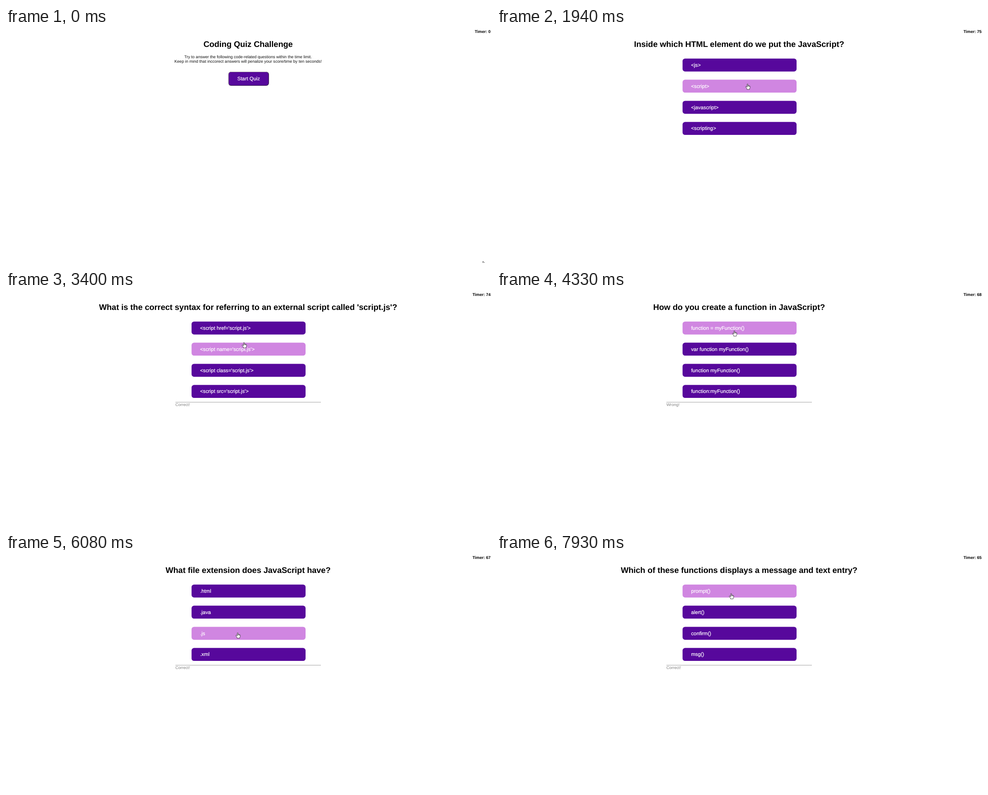
An HTML page with a canvas that plays this animation: 1075x521 px, repeating every 8 s.

```html
<!DOCTYPE html>
<html lang="en">
<head>
<meta charset="utf-8">
<title>Coding Quiz</title>
<style>
html, body { margin: 0; width: 100%; height: 100%; overflow: hidden; background: #fff; }
canvas { display: block; }
</style>
</head>
<body>
<canvas id="stage" width="1075" height="521"></canvas>
<script>
const ctx = document.getElementById('stage').getContext('2d');
const LOOP = 8000;
const ZOOM = 0.565; // page pixels to stage pixels
const MID = 536.6;
const PURPLE = '#57089c';
const PINK = '#d086e1';

const pages = [
  { at: 0, title: 'Coding Quiz Challenge' },
  { at: 1130, title: 'Inside which HTML element do we put the JavaScript?',
    options: ['<js>', '<script>', '<javascript>', '<scripting>'] },
  { at: 2630, title: "What is the correct syntax for referring to an external script called 'script.js'?",
    options: ['href', 'name', 'class', 'src'].map(a => `<script ${a}='script.js'>`), result: 'Correct!' },
  { at: 3930, title: 'How do you create a function in JavaScript?',
    options: ['function = ', 'var function ', 'function ', 'function:'].map(s => s + 'myFunction()'), result: 'Wrong!' },
  { at: 5560, title: 'What file extension does JavaScript have?',
    options: ['.html', '.java', '.js', '.xml'], result: 'Correct!' },
  { at: 6700, title: 'Which of these functions displays a message and text entry?',
    options: ['prompt()', 'alert()', 'confirm()', 'msg()'], result: 'Correct!' }
];

const ticks = [[0, 0], [1130, 75], [3330, 74], [4330, 68], [5330, 67], [6330, 66], [7330, 65]];

// Each path point: [step count, x, y]
const home = [1057, 517];
const moves = [
  { at: 70, step: 66, path: [[3, 960, 440], [7, 680, 235], [12, 556, 120]] },
  { at: 1130, step: 80, path: [[3, 557, 144.5]] },
  { at: 1940, step: 70, path: [[1, 555.3, 124], [8, 531, 133]] },
  { at: 3030, step: 74, path: [[6, 527.5, 114], [9, 526, 88]] },
  { at: 4860, step: 70, path: [[5, 518, 153], [8, 514, 171]] },
  { at: 6080, step: 67.5, path: [[1, 513.5, 174.5], [5, 504.5, 177]] },
  { at: 7100, step: 67.5, path: [[5, 504, 150], [11, 518.5, 88]] },
  { at: 7930, step: 70, path: [[1, 519, 87.5]] }
];

const arrow = new Path2D('M0 0V17L4 13.3L6.5 19L9 18L6.5 12.2H12Z');
const hand = new Path2D('M-1.6 1.5Q-1.6 0 0 0T1.6 1.5V6Q4 5.3 4.6 7Q7 6.3 7.4 8Q10 7.6 10 10V15L8 18.5V21.5H-2.5V18.5L-7 12.5Q-8 9.5 -5.5 9.6L-1.6 13Z');
const knuckles = new Path2D('M1.6 6V10M4.6 7V10.5M7.4 8V11');

function cursorAt(t) {
  let [x, y] = home;
  for (const { at, step, path } of moves) {
    if (t < at) break;
    const n = Math.floor((t - at) / step + 1e-6) + 1;
    let from = 0;
    for (const [to, px, py] of path) {
      const k = Math.min(1, Math.max(0, (n - from) / (to - from)));
      x += (px - x) * k;
      y += (py - y) * k;
      if (n <= to) break;
      from = to;
    }
  }
  return { x, y };
}

function text(str, x, y, size, color, { align = 'left', weight = 'normal', edge = 0 } = {}) {
  ctx.save();
  ctx.translate(x, y);
  ctx.scale(ZOOM, ZOOM);
  ctx.font = `${weight} ${size}px "Liberation Sans", Arial, sans-serif`;
  ctx.textRendering = 'geometricPrecision';
  ctx.textAlign = align;
  ctx.fillStyle = ctx.strokeStyle = color;
  ctx.fillText(str, 0, 0);
  if (edge) {
    ctx.lineWidth = edge;
    ctx.lineJoin = 'round';
    ctx.strokeText(str, 0, 0);
  }
  ctx.restore();
}

// Light text on a dark button needs slightly heavier strokes
function label(str, x, y, align) {
  text(str, x, y, 20, '#fff', { align, edge: 0.4 });
}

function box(x, y, w, h, r, color) {
  ctx.beginPath();
  ctx.roundRect(x, y, w, h, r);
  ctx.fillStyle = color;
  ctx.fill();
}

function inside(p, x, y, w, h) {
  return p.x >= x && p.x <= x + w && p.y >= y - 1 && p.y <= y + h;
}

// Both views return whether the cursor is over a button
function drawIntro(p) {
  const center = { align: 'center' };
  text('Try to answer the following code-related questions within the time limit.', MID, 66.5, 16, '#111', center);
  text('Keep in mind that inccorect answers will penalize your score/time by ten seconds!', MID, 76.7, 16, '#111', center);
  const [x, y, w, h] = [492.8, 97, 90, 31];
  const over = inside(p, x, y, w, h);
  box(x, y, w, h, 6, '#2c1140');
  ctx.save();
  ctx.beginPath();
  ctx.moveTo(x, y + h);
  ctx.lineTo(x, y);
  ctx.lineTo(x + w, y);
  ctx.lineTo(x + w - h / 2, y + h / 2);
  ctx.lineTo(x + h / 2, y + h / 2);
  ctx.clip();
  box(x, y, w, h, 6, '#86758f');
  ctx.restore();
  box(x + 1.1, y + 1.1, w - 2.2, h - 2.2, 5, over ? PINK : PURPLE);
  label('Start Quiz', x + w / 2, 116.1, 'center');
  return over;
}

function drawQuestion(page, p) {
  const [x, w, h] = [411.3, 252.7, 28.8];
  let any = false;
  page.options.forEach((str, i) => {
    const y = 67.7 + i * 46.85;
    const over = inside(p, x, y, w, h);
    any = any || over;
    box(x, y, w, h, 5.6, over ? PINK : PURPLE);
    label(str, 430.2, y + 18.2);
  });
  if (page.result) {
    ctx.fillStyle = '#999';
    ctx.fillRect(375.5, 246, 322.5, 0.9);
    text(page.result, 375.5, 254.6, 16, '#808080');
  }
  return any;
}

function drawCursor(p, over) {
  ctx.save();
  ctx.translate(p.x, p.y);
  ctx.scale(ZOOM, ZOOM);
  ctx.fillStyle = '#fff';
  ctx.strokeStyle = '#111';
  ctx.lineWidth = 1.3;
  ctx.lineJoin = 'round';
  const shape = over ? hand : arrow;
  ctx.fill(shape);
  ctx.stroke(shape);
  if (over) ctx.stroke(knuckles);
  ctx.restore();
}

function draw(t) {
  const page = pages.findLast(q => t >= q.at);
  const count = ticks.findLast(k => t >= k[0])[1];
  const p = cursorAt(t);
  ctx.fillStyle = '#fff';
  ctx.fillRect(0, 0, 1075, 521);
  text('Timer: ' + count, 1074, 11.2, 16, '#000', { align: 'right', weight: 'bold' });
  text(page.title, MID, 41.7, 32, '#000', { align: 'center', weight: 'bold' });
  const over = page.options ? drawQuestion(page, p) : drawIntro(p);
  drawCursor(p, over);
}

let begin;
function loop(now) {
  begin ??= now;
  draw((now - begin) % LOOP);
  requestAnimationFrame(loop);
}
draw(0);
requestAnimationFrame(loop);
</script>
</body>
</html>
```
